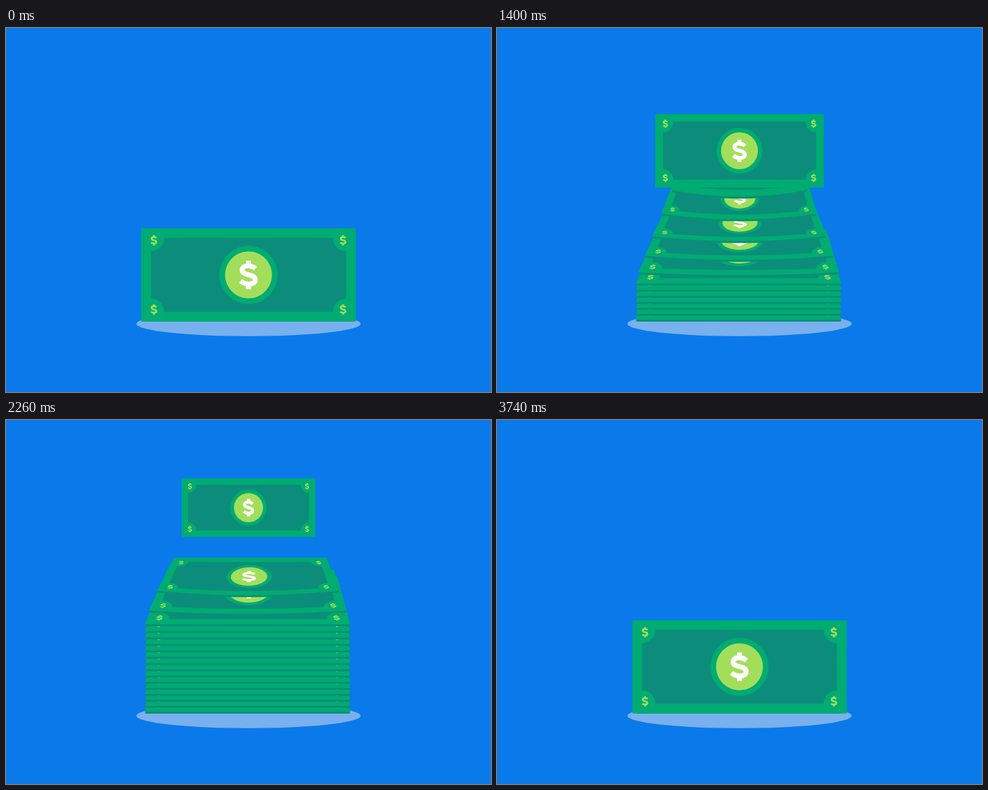
These frames come from a looping animation (800x600 px, 3780 ms). An HTML page:

```html
<!DOCTYPE html>
<html lang="en">
<head>
<meta charset="utf-8">
<title>Stack of bills</title>
<style>
html, body { margin: 0; width: 100%; height: 100%; overflow: hidden; background: #0a7aea; }
svg { display: block; width: 800px; height: 600px; }
.rim { fill: #00ac71; stroke: #00ac71; stroke-width: 3; stroke-linejoin: round; }
.ring { fill: #00ac71; }
.panel, .edge { fill: #0c8d7b; }
.coin { fill: #a3de5b; }
.sign { fill: none; stroke-width: 8.2; }
</style>
</head>
<body>
<svg viewBox="0 0 800 600" xmlns="http://www.w3.org/2000/svg">
  <defs>
    <path id="dollar" class="sign" d="M11.5-10.5C8-13.5 3-15-1-15C-7-15-10.5-12-10.5-8C-10.5-2.5-5-1.5 0-.3C6 1 11 2.5 11 8C11 13 6.5 15 .5 15C-5 15-9.5 13-13 10M0-23.5V-15M0 15V23.5"/>
    <filter id="smear" x="-5%" y="-15%" width="110%" height="130%" color-interpolation-filters="sRGB">
      <feGaussianBlur id="blur" stdDeviation="0 0"/>
    </filter>
  </defs>
  <rect width="800" height="600" fill="#0a7aea"/>
  <ellipse cx="400" cy="487.5" rx="185" ry="20.5" fill="#79b0ee"/>
  <g id="pile"></g>
  <g id="front"></g>
</svg>
<script>
const LOOP = 3780, RISE = 270, SHRUNK = 2500, DROP = 2700;
const W = 354, H = 154, COUNT = 17, EDGE = 4;
const pile = document.getElementById('pile');
const front = document.getElementById('front');
const blur = document.getElementById('blur');

const clamp = v => Math.max(0, Math.min(1, v));
const mix = (a, b, k) => a + (b - a) * k;
const smooth = k => k * k * (3 - 2 * k);

// cubic-bezier(.293, 0, .189, 1)
function glide(x) {
  if (x <= 0 || x >= 1) return clamp(x);
  let lo = 0, hi = 1;
  for (let i = 0; i < 24; i++) {
    const s = (lo + hi) / 2, q = 1 - s;
    if (3 * q * q * s * .293 + 3 * q * s * s * .189 + s * s * s < x) lo = s; else hi = s;
  }
  return smooth(lo);
}

function frontPose(t) {
  const rising = t < DROP;
  const fall = clamp((t - DROP) / (LOOP - DROP));
  const w = rising
    ? mix(W, 203, clamp((t - RISE) / (SHRUNK - RISE)))
    : mix(203, W, smooth(fall));
  const cy = rising
    ? mix(407, 139.5, glide((t - RISE) / (DROP - RISE)))
    : mix(139.5, 407, glide(fall));
  const h = w * H / W;
  return { top: cy - h / 2, bottom: cy + h / 2, wTop: w, wBottom: w, cTop: 400, cBottom: 400, bend: 0, cy };
}

// Maps a point of the flat bill to the stage
const project = p => (x, y) => {
  const a = 2 * x / W - 1, v = y / H;
  return [
    mix(p.cTop, p.cBottom, v) + a * mix(p.wTop, p.wBottom, v) / 2,
    mix(p.top, p.bottom, v) - p.bend * v * a * a
  ];
};

function outline(points, map) {
  const out = [];
  points.forEach(([x, y], i) => {
    const [nx, ny] = points[(i + 1) % points.length];
    const n = Math.max(1, Math.ceil(Math.hypot(nx - x, ny - y) / 30));
    for (let k = 0; k < n; k++) {
      out.push(map(mix(x, nx, k / n), mix(y, ny, k / n)).map(c => c.toFixed(2)).join());
    }
  });
  return 'M' + out.join('L') + 'Z';
}

function arc(cx, cy, r, from, to, n) {
  return Array.from({ length: n + 1 }, (_, i) => {
    const a = mix(from, to, i / n) * Math.PI / 180;
    return [cx + r * Math.cos(a), cy + r * Math.sin(a)];
  });
}

const box = d => [[d, d], [W - d, d], [W - d, H - d], [d, H - d]];
const RIM = box(1.5);
const PANEL = box(16).flatMap(([x, y], k) => arc(x, y, 22, 90 + 90 * k, 90 * k, 7));
const RING = arc(W / 2, H / 2, 48, 0, 360, 48);
const COIN = arc(W / 2, H / 2, 38.7, 0, 360, 48);
const SIGNS = [[21, 20], [W - 21, 20], [W - 21, H - 20], [21, H - 20]];

function sign(map, x, y, size, color) {
  const o = map(x, y), r = map(x + 1, y), d = map(x, y + 1);
  const m = [r[0] - o[0], r[1] - o[1], d[0] - o[0], d[1] - o[1]].map(v => (v * size).toFixed(4));
  return `<use href="#dollar" stroke="${color}" transform="matrix(${m},${o[0].toFixed(2)},${o[1].toFixed(2)})"/>`;
}

function bill(pose, thick) {
  const map = project(pose);
  const shape = (name, pts, m = map) => `<path class="${name}" d="${outline(pts, m)}"/>`;
  const lower = (x, y) => {
    const [px, py] = map(x, H);
    return [px, py + y];
  };
  return (thick ? shape('edge', [[0, -2], [W, -2], [W, EDGE - 1], [W - 1.5, EDGE], [1.5, EDGE], [0, EDGE - 1]], lower) : '') +
    shape('rim', RIM) + shape('panel', PANEL) + shape('ring', RING) + shape('coin', COIN) +
    sign(map, W / 2, H / 2, 1, '#fff') +
    SIGNS.map(([x, y]) => sign(map, x, y, .36, '#a3de5b')).join('');
}

const restY = i => 484 - 9.62 * i - .047 * i * i;
const landTime = i => 805 + 84 * i + 1.26 * i * i;
const flight = i => i < 3 ? 370 : Math.min(525, 310 + 40 * (i - 3));

function stackPose(i, t, lead) {
  const left = clamp((landTime(i) - t) / flight(i));
  const base = restY(i) - EDGE;
  const w = 338 - 130 * left ** 1.3;
  return {
    top: mix(base - 77, lead.top, left ** 3),
    bottom: mix(base, lead.bottom, left ** 1.7),
    wTop: w * .843, wBottom: w,
    cTop: 404 - 3 * left, cBottom: 398.5 + 1.5 * left,
    bend: 11 * left ** .4
  };
}

function draw(t) {
  const lead = frontPose(t);
  let html = '';
  for (let i = 0; i < COUNT; i++) {
    const out = t > landTime(i) - flight(i);
    const crushed = t > DROP && lead.bottom > restY(i) + 14;
    if (out && !crushed) html += bill(stackPose(i, t, lead), true);
  }
  pile.innerHTML = html;
  front.innerHTML = bill(lead, false);

  const speed = t > DROP ? (lead.cy - frontPose(t - 10).cy) / 10 : 0;
  if (speed > .04) {
    blur.setAttribute('stdDeviation', '0 ' + (speed * 6.7).toFixed(2));
    front.setAttribute('filter', 'url(#smear)');
  } else {
    front.removeAttribute('filter');
  }
}

// 20 ms steps on the way up, 40 ms steps on the way down
function step(t) {
  if (t < 280) return 0;
  return t < 2540 ? Math.floor(t / 20) * 20 : 2540 + Math.floor((t - 2540) / 40) * 40;
}

const start = performance.now();
let last = -1;
function tick() {
  const t = step((performance.now() - start) % LOOP);
  if (t !== last) draw(last = t);
  requestAnimationFrame(tick);
}
tick();
</script>
</body>
</html>
```
